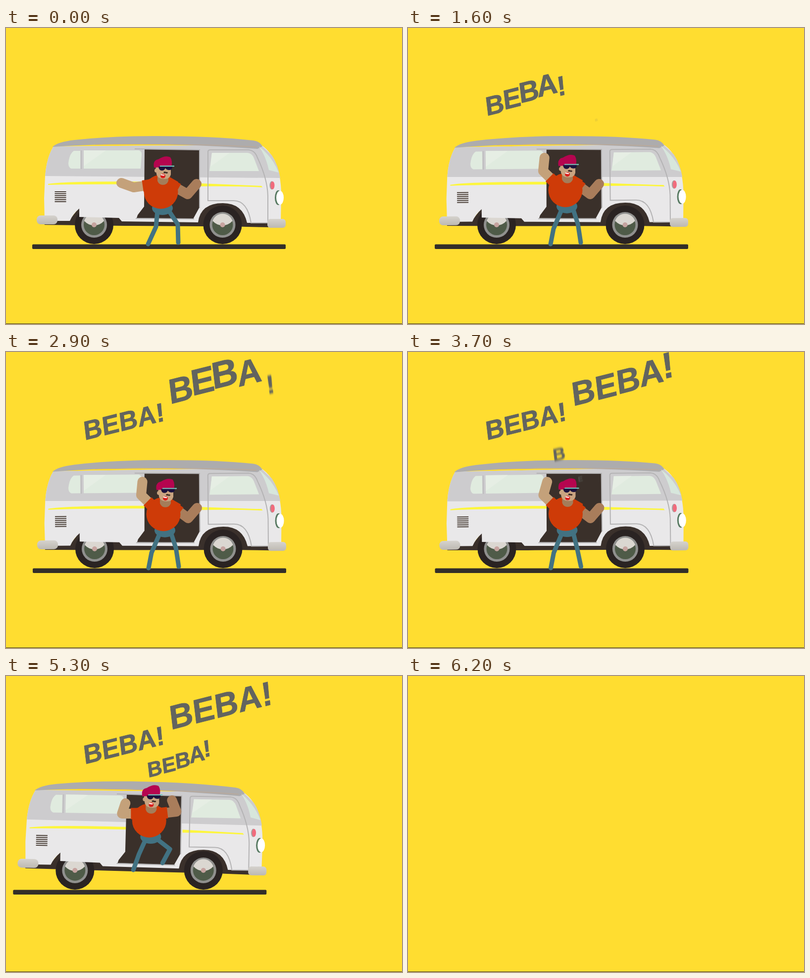
Write an HTML page that moves like this. It is 800x600 px and loops after 8 s.

```html
<!DOCTYPE html>
<html lang="en">
<head>
<meta charset="utf-8">
<title>Beba van</title>
<style>
  html, body { margin: 0; width: 100%; height: 100%; overflow: hidden; background: #ffdd30; }
  svg { display: block; width: 100vw; height: 100vh; }
  text { font-family: "Liberation Sans", Arial, sans-serif; font-weight: 700; fill: #62645f; stroke: #62645f; stroke-width: .8; }
  .limb { fill: none; stroke-linecap: round; stroke-linejoin: round; }
  .seam { fill: none; stroke: #b4b3b4; stroke-width: 2; }
  .shirt { fill: #ce3b08; }
</style>
</head>
<body>
<svg viewBox="0 0 800 600" xmlns="http://www.w3.org/2000/svg">
  <defs>
    <filter id="blur" x="-50%" y="-50%" width="200%" height="200%"><feGaussianBlur stdDeviation="0.8 2.6"/></filter>
    <linearGradient id="chrome" x2="0" y2="1">
      <stop offset="0" stop-color="#d5d2cd"/><stop offset="1" stop-color="#bdb9b2"/>
    </linearGradient>
    <g id="wheel">
      <circle r="39" fill="#2a2322"/>
      <circle r="26" fill="#90908e"/>
      <circle r="21" fill="#4f5b48"/>
      <path d="M-20-8A21 21 0 0 1 20-8Q12 1 0 1T-20-8Z" fill="#dbd7d1"/>
      <circle r="5" fill="#c6a39f"/>
    </g>
  </defs>
  <rect width="800" height="600" fill="#ffdd30"/>
  <g id="scene">
    <g id="van">
      <rect x="53" y="438.500" width="512" height="9.500" rx="2" fill="#332e29"/>
      <g class="tilt" fill="#3a302b">
        <path d="M75 389H128L148 364L236 380V391L400 393V402L240 401L78 399Z"/>
        <path d="M386 400Q392 350 438 352Q482 352 490 394H540V404L486 403Z"/>
      </g>
      <use href="#wheel" x="178" y="399"/>
      <use href="#wheel" x="437.500" y="399"/>
      <g class="tilt">
        <path fill="#e9e8e9" d="M96 240Q82 262 79 300L77 345L78 391H129Q135 377 148 366V383L228 385L234 392L388 394Q393 355 438 355Q478 355 487 395H555L556 340Q556 296 542 267Q530 246 515 237Z"/>
        <path fill="#cdccce" d="M96 240Q82 262 79 300L554 304Q550 278 537 258L515 237Z"/>
        <path fill="#adacad" d="M94 241Q104 231 138 227Q210 219 300 219Q420 219 500 228Q513 230 518 240L508 245Q380 236 270 235Q180 235 94 241Z"/>
        <path d="M180 236Q380 234 506 241" fill="none" stroke="#c2a78e"/>
        <g fill="#e0ebdf">
          <path d="M137 249H150V285H132Q126 283 126 274Q128 255 137 249Z"/>
          <path d="M157 248H268Q274 249 274 256L272 285H157Z"/>
          <path d="M416 253H488Q497 254 501 264L511 290H411Z"/>
          <path d="M511 240Q539 262 551 293L531 288Q525 260 511 240Z" fill="#d7e6dc"/>
        </g>
        <path fill="#e6eee4" d="M157 248H202L157 280ZM416 253H452L413 281Z"/>
        <path d="M152 248V286" stroke="#bdbcbe" stroke-width="2"/>
        <g fill="#fdf63c">
          <path d="M85 316Q120 310 280 311.500V317Q150 316 85 318Z"/>
          <path d="M394 315L516 320L518 323Q460 320 394 321Z"/>
        </g>
        <path fill="#3a302a" d="M280 246L391 247L390 365L378 387L264 385L266 379L279 362Z"/>
        <g class="seam">
          <path d="M260 245L392 247M262 386L380 387M391 247V365"/>
          <path d="M408 350V251Q408 247 413 247H490Q503 248 508 263Q528 305 529 340V395H495Q488 350 460 350H407"/>
        </g>
        <path d="M110 331V353" stroke="#4b4039" stroke-width="23" stroke-dasharray="2 2"/>
        <ellipse cx="537" cy="319" rx="4.500" ry="8.500" fill="#a9a09f"/>
        <ellipse cx="538.500" cy="319" rx="4" ry="8" fill="#f16b7c"/>
        <ellipse cx="550" cy="344" rx="7" ry="15" fill="#587a62"/>
        <ellipse cx="553.500" cy="344" rx="7.500" ry="14" fill="#fff"/>
        <rect x="62" y="380" width="42" height="18" rx="8" fill="url(#chrome)"/>
        <rect x="528" y="387" width="37" height="18" rx="6" fill="url(#chrome)"/>
      </g>
      <g id="man">
        <g class="limb" stroke="#427282" stroke-width="9"><path id="legL"/><path id="legR"/></g>
        <ellipse id="hips" rx="21" ry="14" fill="#427282"/>
        <path id="armL" class="limb" stroke="#c4a17a" stroke-width="20"/>
        <path id="armR" class="limb" stroke="#a97d5b" stroke-width="20"/>
        <g stroke="#ce3b08" stroke-width="23"><path id="sleeveL"/><path id="sleeveR"/></g>
        <g id="upper">
          <circle class="shirt" r="34.500"/>
          <path class="shirt" d="M-32-22L-12-31H16L35-20L28 2H-29Z"/>
          <path fill="#a47d5a" d="M-7-38H15V-22Q12-14 4-14T-7-22Z"/>
          <path fill="#c9a480" d="M-11-54H20V-35Q18-26 7-26Q-7-26-9-36Z"/>
          <circle cx="-9" cy="-43" r="4" fill="#c9a480"/>
          <path fill="#b5054f" d="M-14-49Q-17-64-5-66Q9-75 19-70Q24-62 21-51Z"/>
          <path d="M-2-52H27" stroke="#75c5bd" stroke-width="2.200"/>
          <path fill="#1b123c" d="M-5-51H23Q23-44 17-44Q11-44 9-48Q7-43 2-43Q-4-43-5-51Z"/>
          <path fill="#3b2922" d="M5-40Q9-42 10-40Q14-41 14-38Q11-36 9-38Q6-36 5-40Z"/>
          <ellipse cx="4" cy="-32" rx="5" ry="4.500" fill="#d91f1c"/>
          <path d="M0-34.500L7-33.500" stroke="#fff" stroke-width="2.200"/>
        </g>
      </g>
    </g>
    <g id="words"></g>
  </g>
  <rect y="599" width="800" height="1" fill="#3d361c"/>
</svg>
<script>
const LOOP = 8000, STEP = 100, SCENE_END = 6200;
const PULL_BACK = 4600, LAUNCH = 5500;
const $ = id => document.getElementById(id);
const tilted = document.querySelectorAll('.tilt');

const ramp = (t, from, to) => Math.min(1, Math.max(0, (t - from) / (to - from)));
const smooth = u => u * u * (3 - 2 * u);

const start = {
  torso: [313, 332], elbowL: [258, 323], handL: [233, 314], elbowR: [367, 337], handR: [385, 316],
  kneeL: [303, 403], footL: [287, 438], kneeR: [347, 398], footR: [348, 435]
};
const wave = { ...start, torso: [317, 330], elbowL: [272, 290], handL: [264, 263], kneeL: [293, 407] };
const climb = {
  ...wave, torso: [322, 323], elbowL: [273, 284], handL: [286, 260], elbowR: [369, 279], handR: [383, 255],
  kneeL: [304, 395], footL: [291, 430], kneeR: [370, 356], footR: [365, 391]
};
const hang = {
  ...climb, torso: [328, 298], handL: [280, 263], elbowR: [383, 280], handR: [374, 257],
  kneeL: [307, 367], footL: [296, 398], footR: [355, 384]
};

function blend(a, b, u) {
  const pose = {};
  for (const joint in a) pose[joint] = a[joint].map((v, k) => v + (b[joint][k] - v) * smooth(u));
  return pose;
}

function poseAt(t, idle) {
  let pose = blend(start, wave, ramp(t, 0, 900));
  pose.handL[0] += 16 * idle;
  pose.torso[1] -= 2 * idle;
  pose.kneeR[0] -= 7 * idle;
  pose = blend(pose, climb, ramp(t, 4200, 4700));
  return blend(pose, hang, ramp(t, 4700, 5200));
}

const letters = [];
const words = [
  { start: 0, x: 159, y: 179, size: 53 },
  { start: 1550, x: 333, y: 109, size: 67.5 },
  { start: 3300, x: 287, y: 205, size: 42.5 }
];
for (const { start, x, y, size } of words) {
  let pen = 0;
  [...'BEBA!'].forEach((char, i) => {
    const el = document.createElementNS('http://www.w3.org/2000/svg', 'text');
    el.textContent = char;
    el.setAttribute('font-size', size);
    el.setAttribute('text-anchor', 'middle');
    el.setAttribute('y', size * .344);
    $('words').append(el);
    const width = el.getComputedTextLength(), mid = pen + width / 2;
    pen += width;
    letters.push({ el, start: start + i * 250, x: x + mid * .97 - size * .041, y: y - mid * .245 - size * .344 });
  });
}

// Each letter springs up from below, overshoots and settles.
function drawLetter({ el, start, x, y }, t) {
  const age = Math.max(0, t - start);
  const grow = 1 - Math.cos(Math.PI * age / 1100) * Math.exp(-age / 446);
  const dx = x + (1 - grow) * 30, dy = y + (1 - grow) * 120;
  el.style.display = age > 0 ? '' : 'none';
  el.setAttribute('transform', `translate(${dx} ${dy}) scale(${grow}) matrix(.97 -.245 .12 1 0 0)`);
  el.setAttribute('opacity', Math.min(1, grow * 1.5));
  if (grow < .95) el.setAttribute('filter', 'url(#blur)');
  else el.removeAttribute('filter');
}

const line = (id, ...points) => $(id).setAttribute('d', 'M' + points.map(p => p.join(' ')).join('L'));
const offset = ([x, y], dx, dy) => [x + dx, y + dy];
const place = (id, [x, y]) => $(id).setAttribute('transform', `translate(${x} ${y})`);

function drawArm(side, root, elbow, hand) {
  const dx = elbow[0] - root[0], dy = elbow[1] - root[1], k = 17 / Math.hypot(dx, dy);
  const cuff = offset(root, dx * k, dy * k);
  line('arm' + side, cuff, elbow, hand);
  line('sleeve' + side, root, cuff);
}

function drawMan({ torso, elbowL, handL, elbowR, handR, kneeL, footL, kneeR, footR }) {
  drawArm('L', offset(torso, -20, -14), elbowL, handL);
  drawArm('R', offset(torso, 20, -14), elbowR, handR);
  line('legL', offset(torso, -7, 38), kneeL, footL);
  line('legR', offset(torso, 15, 37), kneeR, footR);
  place('hips', offset(torso, 3, 33));
  place('upper', torso);
}

function draw(t) {
  $('scene').style.display = t < SCENE_END ? '' : 'none';
  const back = ramp(t, PULL_BACK, LAUNCH);
  const go = Math.max(0, t - LAUNCH) / 100;
  const idle = (1 - Math.cos(2 * Math.PI * t / 433)) / 2 * (1 - ramp(t, 4300, 4700));
  const x = 1.5 * idle - 64 * back ** 2 + 49.4 * go ** 2;
  const tilt = 1.6 * Math.sin(Math.PI * back) - 3.3 * Math.min(1, go / 2) - .7 * idle;

  place('van', [x, -6.5 * back]);
  tilted.forEach(g => g.setAttribute('transform', `rotate(${tilt} 314 395)`));
  drawMan(poseAt(t, idle));
  letters.forEach(letter => drawLetter(letter, t));
}

const begin = performance.now();
function tick() {
  const t = (performance.now() - begin) % LOOP;
  draw(Math.floor(t / STEP) * STEP);
  requestAnimationFrame(tick);
}
tick();
</script>
</body>
</html>
```
